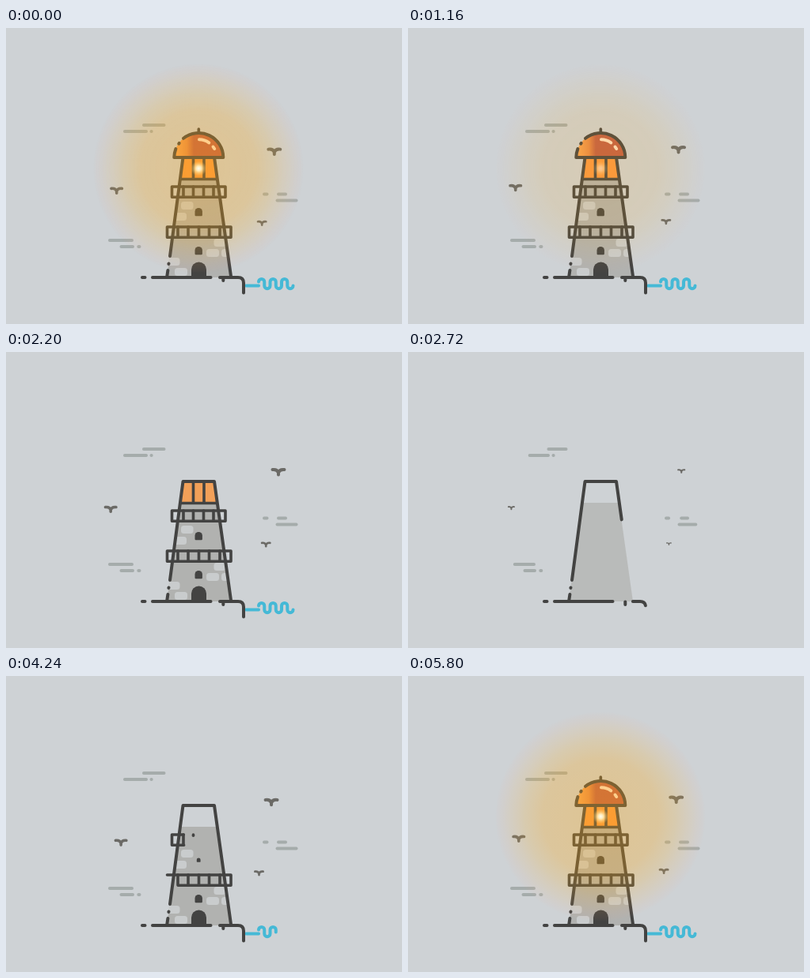
Animation of 500x375 px, one loop 5840 ms. Source, as an HTML page:

```html
<!DOCTYPE html>
<html lang="en">
<head>
<meta charset="utf-8">
<title>Lighthouse</title>
<style>
  html, body { margin: 0; width: 100%; height: 100%; overflow: hidden; background: #ced2d5; }
  svg { display: block; width: 500px; height: 375px; }
  .ink, .cloud, .water, .shine, .bird path { fill: none; stroke-width: 4; stroke-linecap: round; stroke-linejoin: round; }
  .ink { stroke: #434342; }
  .thin { stroke-width: 3.6; }
  .cloud { stroke: #a5acab; }
  .water { stroke: #45b9d6; }
  .shine { stroke: #ffe0c4; }
  .bird path { stroke: #6b6a66; }
  .hole { fill: #434342; }
  .brick { fill: #c9cccd; }
  .pop { transform-box: fill-box; transform-origin: center; }
</style>
</head>
<body>
<svg viewBox="0 0 500 375">
  <defs>
    <radialGradient id="halo">
      <stop offset="0" stop-color="#ffa810" stop-opacity=".33"/>
      <stop offset=".55" stop-color="#ffa810" stop-opacity=".29"/>
      <stop offset=".72" stop-color="#ffae18" stop-opacity=".2"/>
      <stop offset=".87" stop-color="#ffb040" stop-opacity=".11"/>
      <stop offset=".97" stop-color="#ffa070" stop-opacity=".04"/>
      <stop offset="1" stop-color="#ffa070" stop-opacity="0"/>
    </radialGradient>
    <radialGradient id="spark">
      <stop offset="0" stop-color="#fffdf0"/>
      <stop offset=".3" stop-color="#fff0c0" stop-opacity=".95"/>
      <stop offset="1" stop-color="#ffc050" stop-opacity="0"/>
    </radialGradient>
    <linearGradient id="roof">
      <stop offset=".08" stop-color="#f5a052"/>
      <stop offset=".26" stop-color="#e88a48"/>
      <stop offset=".4" stop-color="#c05d46"/>
    </linearGradient>
    <clipPath id="wall"><path d="M219.5 191H266.5L284 316H203Z"/></clipPath>
  </defs>
  <g id="sky"></g>
  <g id="tower"></g>
  <g id="birds"></g>
  <g id="glow">
    <circle cx="243" cy="178" r="133" fill="url(#halo)"/>
    <circle cx="243.3" cy="178" r="10" fill="url(#spark)"/>
  </g>
</svg>
<script>
const LOOP = 5840, OUT = 1840, GONE = 2920, IN = 3160, DONE = 5800;
const parts = [];
const byId = id => document.getElementById(id);
const sky = byId('sky'), tower = byId('tower'), flock = byId('birds'), glow = byId('glow');

function add(parent, tag, attrs) {
  const el = document.createElementNS('http://www.w3.org/2000/svg', tag);
  for (const k in attrs) el.setAttribute(k, attrs[k]);
  parent.appendChild(el);
  return el;
}

function ease(v, from, to) {
  const x = Math.min(1, Math.max(0, (v - from) / (to - from)));
  return x < .5 ? 2 * x * x : 1 - 2 * (1 - x) * (1 - x);
}

// A stroke that draws itself, from its start or outward from its middle.
function line(parent, cls, d, from, to, centred) {
  const el = add(parent, 'path', { class: cls, d, pathLength: 1 });
  parts.push(v => {
    const p = ease(v, from, to);
    el.style.visibility = p > 0 ? 'visible' : 'hidden';
    el.style.strokeDasharray = p < 1 ? `${p} 2` : 'none';
    el.style.strokeDashoffset = centred && p < 1 ? (p - 1) / 2 : 0;
  });
}

function fade(parent, attrs, from, to) {
  const el = add(parent, 'path', attrs);
  parts.push(v => { el.style.opacity = ease(v, from, to); });
}

function pop(parent, tag, attrs, from, to) {
  const el = add(parent, tag, attrs);
  el.classList.add('pop');
  parts.push(v => { el.style.transform = `scale(${ease(v, from, to)})`; });
}

// Clouds: anchored end, growing end, height
[[199.5, 174, 123], [177, 150, 131], [183.5, 183.7, 131],
 [326, 329.5, 210.5], [353, 344, 210.5], [342.5, 366.5, 218.5],
 [159, 131, 269], [160, 145.5, 277], [167.3, 168.5, 277]]
  .forEach(([a, b, y]) => line(sky, 'cloud', `M${a} ${y}H${b}`, 3240, 3790));

// Water
line(sky, 'water', 'M303 326.5H319', 3840, 4020);
let wave = 'M319 321.5';
for (let i = 0; i < 6; i++) {
  const x = 319 + 7.25 * (i + 1), up = i % 2 === 0;
  wave += `A3.62 3.62 0 0 ${up ? 1 : 0} ${x} ${up ? 321.5 : 326.5}`;
  if (i < 5) wave += `V${up ? 326.5 : 321.5}`;
}
line(sky, 'water', wave, 4000, 4480);

// Wall, bricks and openings
fade(tower, { d: 'M219.5 191H266.5L284 316H203Z', fill: '#b1b2b0' }, 3400, 3800);
const bricks = add(tower, 'g', { 'clip-path': 'url(#wall)' });
[[213, 304, 16], [203, 291, 16.5], [253, 280, 16], [272, 280, 14], [262.5, 267, 15], [212, 234, 16], [221, 220, 15.5]]
  .forEach(([x, y, width], i) =>
    pop(bricks, 'rect', { class: 'brick', x, y, width, height: 10, rx: 3.5 }, 3800 + i * 25, 4020 + i * 25));
pop(tower, 'path', { class: 'hole', d: 'M234 316V306a9.5 9.5 0 0 1 19 0V316Z' }, 3800, 4000);
[[277, 3960], [228, 4140]].forEach(([y, at]) =>
  pop(tower, 'path', { class: 'hole', d: `M238.5 ${y + 9}V${y + 4.6}a4.7 4.7 0 0 1 9.4 0V${y + 9}q0 1.2 -1.2 1.2h-7q-1.2 0 -1.2 -1.2Z` }, at, at + 200));

// Lantern room
fade(tower, { d: 'M223 164H263L267 191H219.5Z', fill: '#fa9843' }, 4700, 5000);
line(tower, 'ink thin', 'M220 191.5H266', 4500, 4760);
line(tower, 'ink thin', 'M236.5 191V164', 4560, 4800);
line(tower, 'ink thin', 'M250 191V164', 4620, 4860);

// Dome
fade(tower, { d: 'M212.3 164a31 31 0 0 1 62 0Z', fill: 'url(#roof)' }, 5420, 5620);

// Ground and outline
line(tower, 'ink', 'M172 316H175.5', 3160, 3300);
line(tower, 'ink', 'M185 316H258.5', 3180, 3540);
line(tower, 'ink', 'M274.3 316.5V320', 3400, 3520);
line(tower, 'ink', 'M270 316H293Q300 316 300 323V335.5', 3440, 3900, true);
line(tower, 'ink', 'M203.3 314.5L204.4 307', 3280, 3400);
line(tower, 'ink', 'M205.4 299L205.5 298.4', 3320, 3420);
line(tower, 'ink', 'M207 289L223.5 164H263L284 314.5', 3330, 3860);

// Balconies
line(tower, 'ink thin', 'M203.5 252H284V265.3H203.5Z', 3920, 4360);
[270, 256.5, 243.5, 230, 217].forEach((x, i) =>
  line(tower, 'ink thin', `M${x} 252V265`, 3960 + i * 30, 4100 + i * 30));
line(tower, 'ink thin', 'M277 207.5V201H209.5V214.3H277Z', 4080, 4520, true);
[224, 236.5, 249.5, 262].forEach((x, i) =>
  line(tower, 'ink thin', `M${x} 201V214`, 4140 + i * 80, 4240 + i * 80));

line(tower, 'ink', 'M214.4 153Q212.5 158 212.3 164H274.3A31 31 0 0 0 224 139.8', 5080, 5480);
line(tower, 'ink', 'M218.2 146.6L218.7 145.9', 5440, 5520);
line(tower, 'ink thin', 'M243.3 132V128', 5460, 5580);
line(tower, 'shine', 'M244 141.3Q251 141.5 256.3 145.3', 5540, 5660);
line(tower, 'shine', 'M261.5 150.5L263.2 153', 5700, 5780);

// Birds: start x, y, speed in px per second, size
const birds = [[332.5, 162, 2.35, -2.08, 1], [148.8, 214.2, -3.4, -3.1, .9], [317, 251.3, 2.3, -1.55, .68]]
  .map(([x, y, vx, vy, size]) => {
    const el = add(flock, 'g', { class: 'bird' });
    add(el, 'path', { d: 'M-7.5 -2.8Q-1.5 -3.6 0 1Q1.5 -3.6 7.5 -2.8M0 1V3.6' });
    return { el, x, y, vx, vy, size };
  });

// Build time: runs forward while appearing and backward, faster, while leaving.
function buildTime(t) {
  if (t < OUT) return DONE;
  if (t < GONE) return DONE - (t - OUT) / (GONE - OUT) * (DONE - IN);
  return Math.min(DONE, Math.max(IN, t));
}

function draw(t) {
  const v = buildTime(t);
  parts.forEach(update => update(v));

  const s = (t - IN + LOOP) % LOOP / 1000;
  const grow = ease(v, 3440, 3840);
  birds.forEach(b => b.el.setAttribute('transform',
    `translate(${b.x + b.vx * s} ${b.y + b.vy * s}) scale(${b.size * grow})`));

  const pulse = t < 1900 ? .7 + .3 * Math.cos(t / 1900 * 2 * Math.PI) : 1;
  glow.style.opacity = ease(v, 5240, 5700) * pulse;
}

const start = performance.now();
function tick() {
  draw((performance.now() - start) % LOOP);
  requestAnimationFrame(tick);
}
tick();
</script>
</body>
</html>
```
